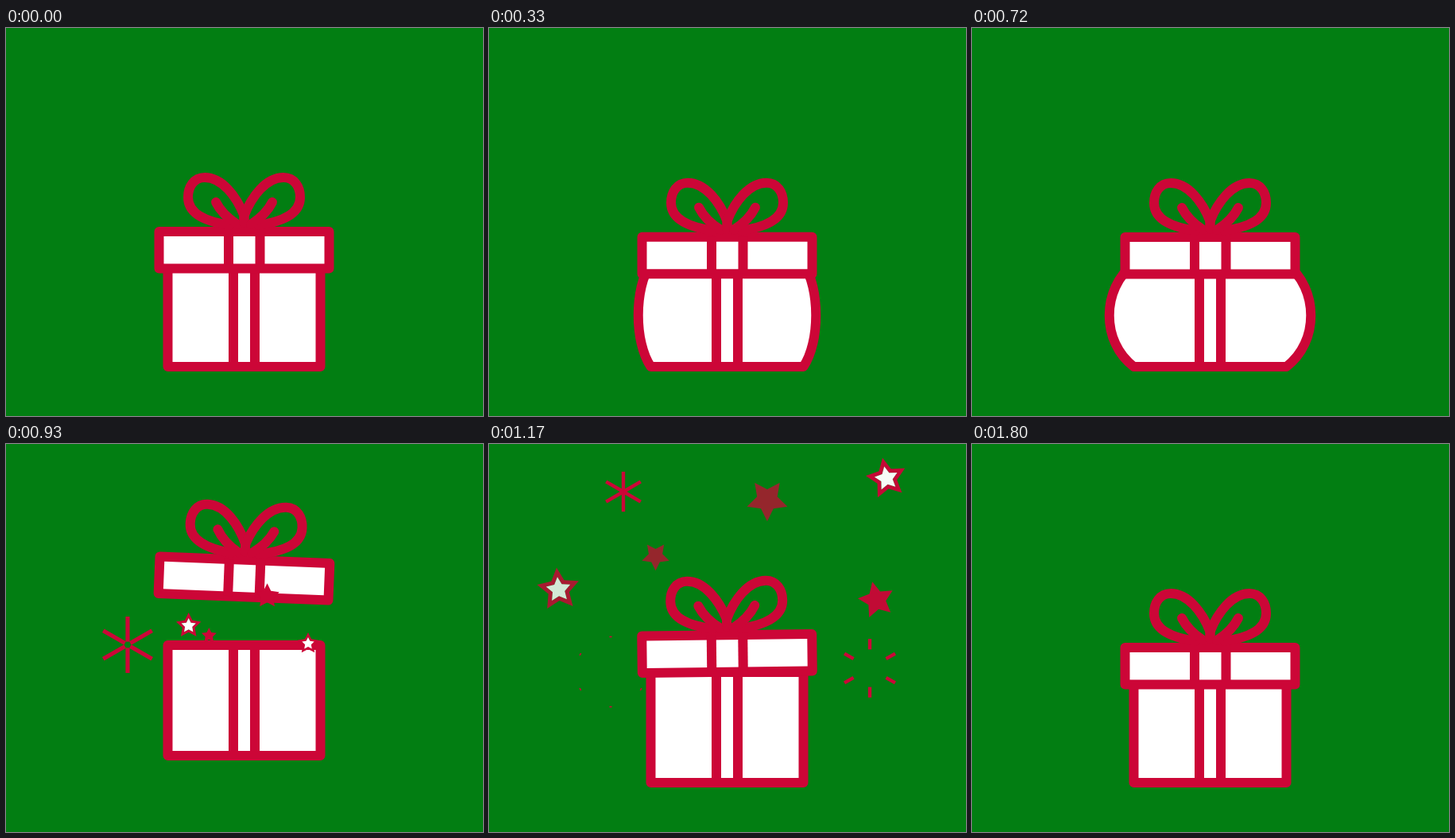
These frames come from a looping animation (600 by 488 pixels, 1.83 s). An HTML page with a canvas:

```html
<!DOCTYPE html>
<html lang="en">
<head>
<meta charset="utf-8">
<title>Gift box</title>
<style>
html, body { margin: 0; width: 100%; height: 100%; overflow: hidden; background: #027e12; }
canvas { display: block; }
</style>
</head>
<body>
<canvas id="stage" width="600" height="488"></canvas>
<script>
const ctx = document.getElementById('stage').getContext('2d');
const LOOP = 1830, STEP = 30;
const GREEN = '#027e12', RED = '#cc0637', WHITE = '#fff';
const SQUASH = 650, LAUNCH = 780, PEAK = 1020;

const BURSTS = [
  { x: 153, y: 286.5, radius: 45, start: 770 },
  { x: 479, y: 282, radius: 40, start: 930 },
  { x: 169, y: 60, radius: 33, start: 1020 },
  { x: 419, y: 160, radius: 27, start: 1170 }
];

// Each star leaves the rim of the box at "from" and lands on x, y
const STARS = [
  { from: 260, x: 209, y: 140, size: 21, start: 920, fade: 1090, spin: 36 },
  { from: 318, x: 350, y: 70, size: 30, start: 890, fade: 1090, spin: 36 },
  { from: 378, x: 500, y: 190, size: 31, start: 1000, fade: 1155, spin: 59 },
  { from: 300, x: 87, y: 183, size: 31, start: 890, fade: 1120, spin: 67, hollow: true },
  { from: 380, x: 502, y: 40, size: 31, start: 930, fade: 1160, spin: 61, hollow: true }
];

const bowLoop = new Path2D('M299.5 246 V236 C290 212 272 188 250 188 C236 188 229 200 229 213 C229 231 246 243 282 248');
const bowTail = new Path2D('M264 219 Q272 235 291 247');

const phase = (t, start, length) => Math.min(1, Math.max(0, (t - start) / length));
const easeOut = (u, power) => 1 - (1 - u) ** power;
const easeInOut = u => (1 - Math.cos(Math.PI * u)) / 2;

const lidDrop = t => 7 * easeOut(phase(t, 0, 420), 2);
const bodyLift = t => 34 * Math.sin(Math.PI * phase(t, 760, 340));
const bulge = t => easeInOut(phase(t, 0, SQUASH)) * (1 - easeInOut(phase(t, 720, 120)));

function lidShift(t) {
  if (t > PEAK) return -134 / Math.cosh((t - PEAK) / 53);
  return lidDrop(t) - 141 * Math.sin(Math.PI / 2 * phase(t, LAUNCH, PEAK - LAUNCH));
}

// A wobble in degrees that dies away after one swing
function lidTilt(t) {
  const u = phase(t, LAUNCH, 600);
  return 4.2 * Math.sin(2 * Math.PI * u) * Math.exp(-2.45 * u);
}

function line(x1, y1, x2, y2) {
  ctx.beginPath();
  ctx.moveTo(x1, y1);
  ctx.lineTo(x2, y2);
  ctx.stroke();
}

function starPath(r) {
  const path = new Path2D();
  for (let i = 0; i < 10; i++) {
    const a = i * Math.PI / 5, d = i % 2 ? r * 0.5 : r;
    path.lineTo(d * Math.sin(a), -d * Math.cos(a));
  }
  path.closePath();
  return path;
}

function drawStar(star, t) {
  if (t < star.start) return;
  const go = easeOut(phase(t, star.start, 320), 3);
  const r = star.size * (0.45 + 0.55 * easeOut(phase(t, star.start, 500), 2));
  const turn = Math.min(108, star.spin * (t - 930) / 240);
  const shape = starPath(r);
  ctx.save();
  ctx.translate(star.from + (star.x - star.from) * go, 251 + (star.y - 251) * go);
  ctx.rotate(turn * Math.PI / 180);
  ctx.globalAlpha = 1 - phase(t, star.fade, 290);
  ctx.fillStyle = RED;
  if (star.hollow) {
    const core = starPath(r * 0.58);
    shape.addPath(core);
    ctx.fill(shape, 'evenodd');
    ctx.fillStyle = WHITE;
    ctx.fill(core);
  } else {
    ctx.fill(shape);
  }
  ctx.restore();
}

// Six rays shoot out, then their inner ends catch up
function drawBurst({ x, y, radius, start }, t) {
  const u = phase(t, start, 600);
  if (u === 0 || u === 1) return;
  const outer = radius * easeOut(u, 5);
  const inner = radius * easeOut(phase(t, start + 150, 450), 4);
  ctx.lineCap = 'butt';
  ctx.lineWidth = (2.2 + 0.075 * radius) * (1 - u * u);
  for (let i = 0; i < 6; i++) {
    const a = i * Math.PI / 3, dx = Math.sin(a), dy = Math.cos(a);
    line(x + inner * dx, y + inner * dy, x + outer * dx, y + outer * dy);
  }
}

function drawBody(t) {
  const left = 203.5, right = 395.5, bottom = 426;
  const top = 287 + (t < LAUNCH ? 1.4 * lidDrop(t) : 0);
  const swell = 41 * bulge(t), bend = (bottom - top) * 0.24;
  ctx.lineWidth = 12;
  ctx.beginPath();
  ctx.moveTo(left, top);
  ctx.lineTo(right, top);
  ctx.bezierCurveTo(right + swell, top + bend, right + swell, bottom - bend, right, bottom);
  ctx.lineTo(left, bottom);
  ctx.bezierCurveTo(left - swell, bottom - bend, left - swell, top + bend, left, top);
  ctx.closePath();
  ctx.fill();
  ctx.stroke();
  line(286, top, 286, bottom);
  line(313, top, 313, bottom);
}

function drawLid(t) {
  ctx.save();
  ctx.translate(300, 279 + lidShift(t));
  ctx.rotate(lidTilt(t) * Math.PI / 180);
  ctx.translate(-300, -279);
  ctx.lineWidth = 12;
  ctx.beginPath();
  ctx.rect(192.5, 256, 214, 46.5);
  ctx.fill();
  ctx.stroke();
  line(280, 256, 280, 302);
  line(319.5, 256, 319.5, 302);
  ctx.lineCap = 'round';
  for (let side = 0; side < 2; side++) {
    ctx.stroke(bowLoop);
    ctx.stroke(bowTail);
    ctx.translate(599, 0);
    ctx.scale(-1, 1);
  }
  ctx.restore();
}

function draw(t) {
  ctx.fillStyle = GREEN;
  ctx.fillRect(0, 0, 600, 488);
  ctx.fillStyle = WHITE;
  ctx.strokeStyle = RED;
  ctx.lineJoin = 'round';
  ctx.save();
  ctx.translate(0, -bodyLift(t));
  BURSTS.forEach(burst => drawBurst(burst, t));
  ctx.lineCap = 'butt';
  drawBody(t);
  ctx.restore();
  drawLid(t);
  STARS.forEach(star => drawStar(star, t));
}

const begin = performance.now();
function tick() {
  const t = (performance.now() - begin) % LOOP;
  draw(Math.floor(t / STEP) * STEP);
  requestAnimationFrame(tick);
}
tick();
</script>
</body>
</html>
```
